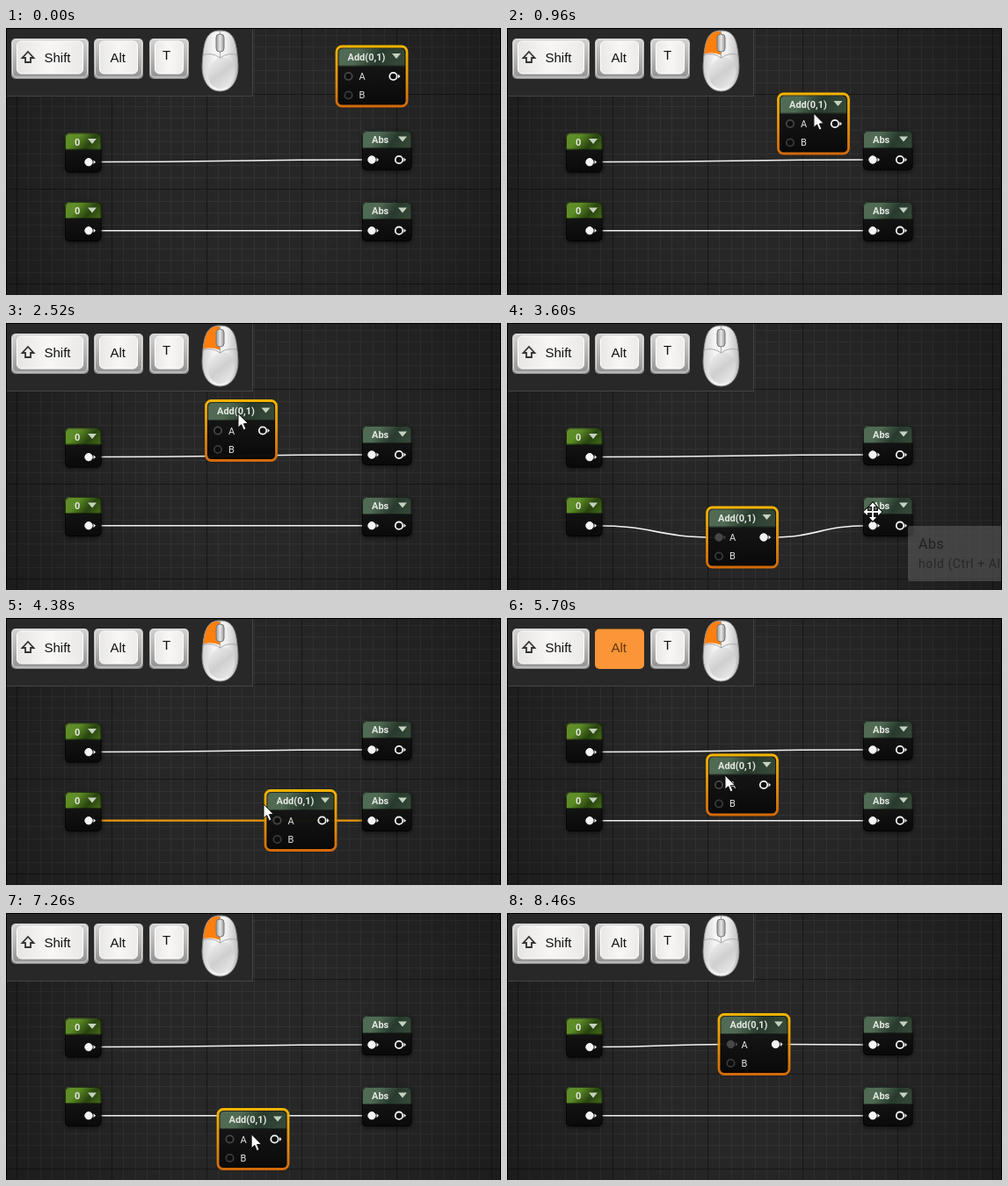
These frames come from a looping animation (563x304 px, 8520 ms). An HTML page with a canvas:

```html
<!DOCTYPE html>
<html lang="en">
<head>
<meta charset="utf-8">
<title>Node graph: drop a node onto a wire</title>
<style>
  html, body { margin: 0; width: 100%; height: 100%; overflow: hidden; background: #222; }
  canvas { display: block; }
</style>
</head>
<body>
<canvas id="stage" width="563" height="304"></canvas>
<script>
const W = 563, H = 304, LOOP = 8520, STEP = 60, CELL = 13.5;
const ctx = document.getElementById('stage').getContext('2d');
const ORANGE = '#e8960f';
const UI_FONT = 'Roboto, sans-serif', KEY_FONT = '"Liberation Sans", Arial, sans-serif';

// time, grid column, grid row of the dragged node
const NODE_PATH = [
  [600, 11, -13], [960, 6, -9], [1380, 0, -1], [1500, 0, 0], [1620, 0, 0],
  [1800, 0, 2], [2220, 0, -8], [2520, 0, -8], [2880, 0, 1], [3960, 0, 1],
  [4320, 5, 0], [4380, 5, 0], [4560, 0, 1], [4740, 2, 0], [4980, 0, 0],
  [5220, 0, 2], [5340, 0, 2], [5700, 0, -3], [5880, 0, -4], [6120, 0, 3],
  [6480, 0, -7], [6600, 0, -9], [6720, 1, -9], [6840, 1, -9],
  [7140, 1, 2], [7260, 1, 2], [7620, 1, -6]
];

// time, cursor offset from the unsnapped node
const CURSOR_PATH = [
  [60, 156, 21], [360, 43, 22], [600, 43, 22], [1500, 40, 27], [2220, 38, 16],
  [2520, 38, 16], [2880, 40, 23], [3240, 40, 23], [3540, 190, 6.5],
  [3720, 190, 6.5], [3960, 24, 16], [4380, -0.5, 17], [4560, 24, 17],
  [5700, 22, 24.5], [6480, 32, 32.5], [7620, 42, 29], [7860, 42, 29], [8100, 309, 20]
];

const WIRES = [
  { from: [101, 152.5], to: [411, 150] },
  { from: [101, 230.7], to: [411, 230.7] }
];

const between = (t, a, b) => t >= a && t < b;

function follow(path, t) {
  const i = path.findIndex(k => k[0] > t);
  if (i === 0) return path[0].slice(1);
  if (i < 0) return path[path.length - 1].slice(1);
  const a = path[i - 1], b = path[i];
  const p = (t - a[0]) / (b[0] - a[0]), e = p * p * (3 - 2 * p);
  return a.slice(1).map((v, n) => v + (b[n + 1] - v) * e);
}

function gradient(x0, y0, x1, y1, ...colors) {
  const g = ctx.createLinearGradient(x0, y0, x1, y1);
  colors.forEach((c, i) => g.addColorStop(i / (colors.length - 1), c));
  return g;
}

function paint(fill, stroke, line = 1) {
  if (fill) { ctx.fillStyle = fill; ctx.fill(); }
  if (stroke) { ctx.strokeStyle = stroke; ctx.lineWidth = line; ctx.stroke(); }
}

function box(x, y, w, h, r, fill, stroke, line) {
  ctx.beginPath();
  ctx.roundRect(x, y, w, h, r);
  paint(fill, stroke, line);
}

function polygon(points, fill, stroke, line) {
  ctx.beginPath();
  points.forEach(([x, y]) => ctx.lineTo(x, y));
  ctx.closePath();
  paint(fill, stroke, line);
}

function text(str, x, y, font, color) {
  ctx.font = font;
  ctx.fillStyle = color;
  ctx.fillText(str, x, y);
}

function drawGrid() {
  ctx.fillStyle = '#272727';
  ctx.fillRect(0, 0, W, H);
  for (const major of [false, true]) {
    ctx.fillStyle = major ? '#171717' : '#323232';
    for (let i = -14; i < 50; i++) {
      if ((i % 8 === 0) !== major) continue;
      ctx.fillRect(Math.round(119.5 + i * CELL), 0, 1, H);
      ctx.fillRect(0, Math.round(183 + i * CELL), W, 1);
    }
  }
  const shade = ctx.createRadialGradient(W / 2, H / 2, 120, W / 2, H / 2, 330);
  shade.addColorStop(0, 'rgba(0,0,0,0)');
  shade.addColorStop(1, 'rgba(0,0,0,.3)');
  ctx.fillStyle = shade;
  ctx.fillRect(0, 0, W, H);
}

function wire([x0, y0], [x1, y1], color = '#f2f2f2', width = 1.6) {
  const mid = (x0 + x1) / 2;
  ctx.beginPath();
  ctx.moveTo(x0, y0);
  ctx.bezierCurveTo(mid, y0, mid, y1, x1, y1);
  paint(null, color, width);
}

function pin(x, y, filled, color = '#f4f4f4', arrow = true) {
  ctx.beginPath();
  ctx.arc(x, y, 4.2, 0, 7);
  paint(filled ? color : '#0d0d0d', color, filled ? 1 : 1.8);
  if (arrow) polygon([[x + 5.5, y - 2.4], [x + 8, y], [x + 5.5, y + 2.4]], color);
}

function nodeBody(x, y, w, h, head, title, titleX, colors) {
  ctx.save();
  ctx.shadowColor = 'rgba(0,0,0,.7)';
  ctx.shadowBlur = 5;
  ctx.shadowOffsetY = 1;
  box(x, y, w, h, 5, gradient(0, y, 0, y + h, 'rgba(26,27,26,.9)', 'rgba(8,9,8,.92)'));
  ctx.restore();
  box(x, y, w, head, [5, 5, 0, 0], gradient(x, y, x + w * .8, y + head * 1.5, ...colors));
  ctx.fillStyle = 'rgba(255,255,255,.16)';
  ctx.fillRect(x + 4, y, w - 8, 1);
  ctx.fillStyle = 'rgba(0,0,0,.45)';
  ctx.fillRect(x, y + head - 1, w, 1);
  box(x + .5, y + .5, w - 1, h - 1, 5, null, 'rgba(0,0,0,.65)');
  text(title, titleX, y + 14.2, `bold 11px ${UI_FONT}`, '#e4e8e2');
  const tx = x + w - 10.5, ty = y + 6.5;
  polygon([[tx - 5, ty], [tx + 5, ty], [tx, ty + 6]], '#c5d2bf');
}

const GRAY_GREEN = ['#506a54', '#506a54', '#283a2d', '#354838'];
const GREEN = ['#648f2e', '#5c8b25', '#29430f', '#466f1b'];

function drawFixedNodes() {
  for (const [y, pinY] of [[119.5, 152.7], [198, 230.7]]) {
    nodeBody(67, y, 41.5, 45, 19, '0', 78, GREEN);
    pin(94, pinY, true);
  }
  for (const [y, pinY] of [[117, 150], [198, 230.7]]) {
    nodeBody(405, y, 56.5, 45, 20, 'Abs', 416, GRAY_GREEN);
    pin(416, pinY, true);
    pin(447, pinY, false);
  }
}

function drawAddNode(x, y, linked) {
  nodeBody(x + 3, y + 3, 77, 65, 21, 'Add(0,1)', x + 14, GRAY_GREEN);
  box(x + 1.5, y + 1.5, 80, 68, 6, null, gradient(0, y, 0, y + 71, '#f5b400', '#e5930a', '#d0680a'), 2.8);
  pin(x + 15, y + 35.5, linked, '#474747', linked);
  pin(x + 15, y + 57, false, '#3a3a3a', false);
  text('A', x + 27, y + 39.5, `11px ${UI_FONT}`, '#e6e6e6');
  text('B', x + 27, y + 60.8, `11px ${UI_FONT}`, '#e6e6e6');
  pin(x + 66, y + 35.5, linked);
}

function drawWires(node, linkedWire, hotWire) {
  const pinY = node.y + 35.5;
  WIRES.forEach((w, i) => {
    if (i === linkedWire) {
      wire(w.from, [node.x + 11, pinY]);
      wire([node.x + 73, pinY], w.to);
    } else if (i === hotWire) {
      wire(w.from, w.to, ORANGE, 2.2);
    } else {
      wire(w.from, w.to);
    }
  });
}

function keyCap(x, w, label, labelX, labelY, pressed) {
  if (pressed) {
    box(x, 12.5, w, 45.5, 5, '#fb9537');
  } else {
    box(x, 12, w, 46, 5, gradient(0, 12, 0, 58, '#d2d2d2', '#b4b4b4', '#8f8f8f'));
    box(x + 1.5, 13, w - 3, 43, 5, null, '#dedede');
    box(x + 6.5, 15, w - 13, 37, 5, gradient(x, 0, x + w, 0, '#e5e3e2', '#f8f7f6', '#e9e7e6'), '#fff');
  }
  text(label, labelX, labelY, `15px ${KEY_FONT}`, pressed ? '#613812' : '#111');
}

function drawMouse(pressed) {
  const outline = new Path2D('M243.5 3C228 3 225 15 223.5 37C221 58 230 72 243.5 72S266 58 263.5 37C262 15 259 3 243.5 3Z');
  ctx.fillStyle = gradient(223, 0, 264, 0, '#d0d0d0', '#f5f5f5', '#f0f0f0', '#bdbdbd');
  ctx.fill(outline);
  ctx.save();
  ctx.clip(outline);
  ctx.beginPath();
  ctx.ellipse(245, 51, 15, 18, .3, 0, 7);
  paint(gradient(230, 34, 258, 70, '#f3f3f3', '#cfcfcf', '#eee'));
  if (pressed) {
    ctx.beginPath();
    ctx.moveTo(223, 4);
    ctx.lineTo(244, 4);
    ctx.lineTo(244, 31);
    ctx.quadraticCurveTo(233, 26, 223, 30);
    paint('#ff7f0e');
  }
  ctx.beginPath();
  ctx.moveTo(223, 31);
  ctx.quadraticCurveTo(234, 27, 243.5, 34);
  ctx.quadraticCurveTo(253, 27, 264, 31);
  ctx.moveTo(243.5, 3);
  ctx.lineTo(243.5, 34);
  paint(null, '#a9a9a9');
  ctx.restore();
  ctx.strokeStyle = '#8d8d8d';
  ctx.lineWidth = 1;
  ctx.stroke(outline);
  box(239, 7, 9, 20, 4, gradient(239, 0, 248, 0, '#999', '#e6e6e6', '#999'), '#777');
}

function drawInputPanel(alt, pressed) {
  ctx.fillStyle = '#282828';
  ctx.fillRect(0, 0, 281, 77);
  ctx.fillStyle = '#444';
  ctx.fillRect(280, 0, 1, 78);
  ctx.fillRect(0, 77, 281, 1);
  keyCap(6, 88, 'Shift', 43.5, 39, false);
  polygon([[25, 27], [31.5, 34], [28, 34], [28, 39], [22, 39], [22, 34], [18.5, 34]], null, '#333', 1.8);
  keyCap(100, 56, 'Alt', 118.5, 38.5, alt);
  keyCap(163, 45, 'T', 178, 36, false);
  drawMouse(pressed);
}

function drawTooltip(title, x, y, alpha) {
  ctx.save();
  ctx.globalAlpha = alpha;
  box(x, y, 190, 63, 2, '#5a5a5a');
  ctx.letterSpacing = '.6px';
  text(title, x + 12, y + 26, `16px ${UI_FONT}`, '#0c0c0c');
  text('hold (Ctrl + Alt) for more', x + 12, y + 48, `14px ${UI_FONT}`, '#161616');
  ctx.restore();
}

function drawCursor(x, y, moving) {
  ctx.save();
  ctx.translate(x, y);
  if (moving) {
    const arm = [[-1, -1], [-1, -6], [-4, -6], [0, -10.5], [4, -6], [1, -6]];
    const cross = [];
    for (let turn = 0; turn < 4; turn++) {
      const c = Math.cos(turn * Math.PI / 2), s = Math.sin(turn * Math.PI / 2);
      arm.forEach(([px, py]) => cross.push([px * c - py * s, px * s + py * c]));
    }
    polygon(cross, '#fff', '#111', 2.2);
    polygon(cross, '#fff');
  } else {
    polygon([[0, 0], [0, 16], [3.7, 12.7], [6.2, 18.8], [8.9, 17.6], [6.4, 11.7], [11.3, 11.5]], '#fff', '#111', 1);
  }
  ctx.restore();
}

function draw(t) {
  const [col, row] = follow(NODE_PATH, t), [dx, dy] = follow(CURSOR_PATH, t);
  const node = { x: 226 + Math.round(col) * CELL, y: 195 + Math.round(row) * CELL };
  const cx = 226 + col * CELL + dx, cy = 195 + row * CELL + dy;
  const held = between(t, 600, 3240) || between(t, 3960, 7860);
  const alt = between(t, 5100, 6840);
  const linkedWire = between(t, 3240, 4200) ? 1 : t >= 7860 ? 0 : -1;
  const linked = linkedWire >= 0;
  const hotWire = held && !alt && !linked && node.x < 330
    ? WIRES.findIndex(w => Math.abs(w.to[1] - node.y - 35.5) < 15) : -1;

  drawGrid();
  drawWires(node, linkedWire, hotWire);
  drawFixedNodes();
  drawAddNode(node.x, node.y, linked);
  drawInputPanel(alt, held || between(t, 8400, 8460));

  if (between(t, 540, 600)) drawTooltip('Add', cx + 40, cy + 16, .3);
  if (between(t, 3540, 3780)) drawTooltip('Abs', 456, 231, Math.min(.6, (t - 3480) / 200));
  if (between(t, 60, 8100)) {
    const areas = [[node.x, node.y, 83, 71], [67, 119, 42, 45], [67, 198, 42, 45], [405, 117, 57, 45], [405, 198, 57, 45]];
    const hover = areas.some(([x, y, w, h]) => between(cx, x, x + w) && between(cy, y, y + h));
    drawCursor(cx, cy, hover && !held);
  }
  ctx.strokeStyle = '#000';
  ctx.lineWidth = 1;
  ctx.strokeRect(.5, .5, W - 1, H);
}

const start = performance.now();
function tick() {
  const t = (performance.now() - start) % LOOP;
  draw(Math.floor(t / STEP) * STEP);
  requestAnimationFrame(tick);
}
tick();
</script>
</body>
</html>
```
